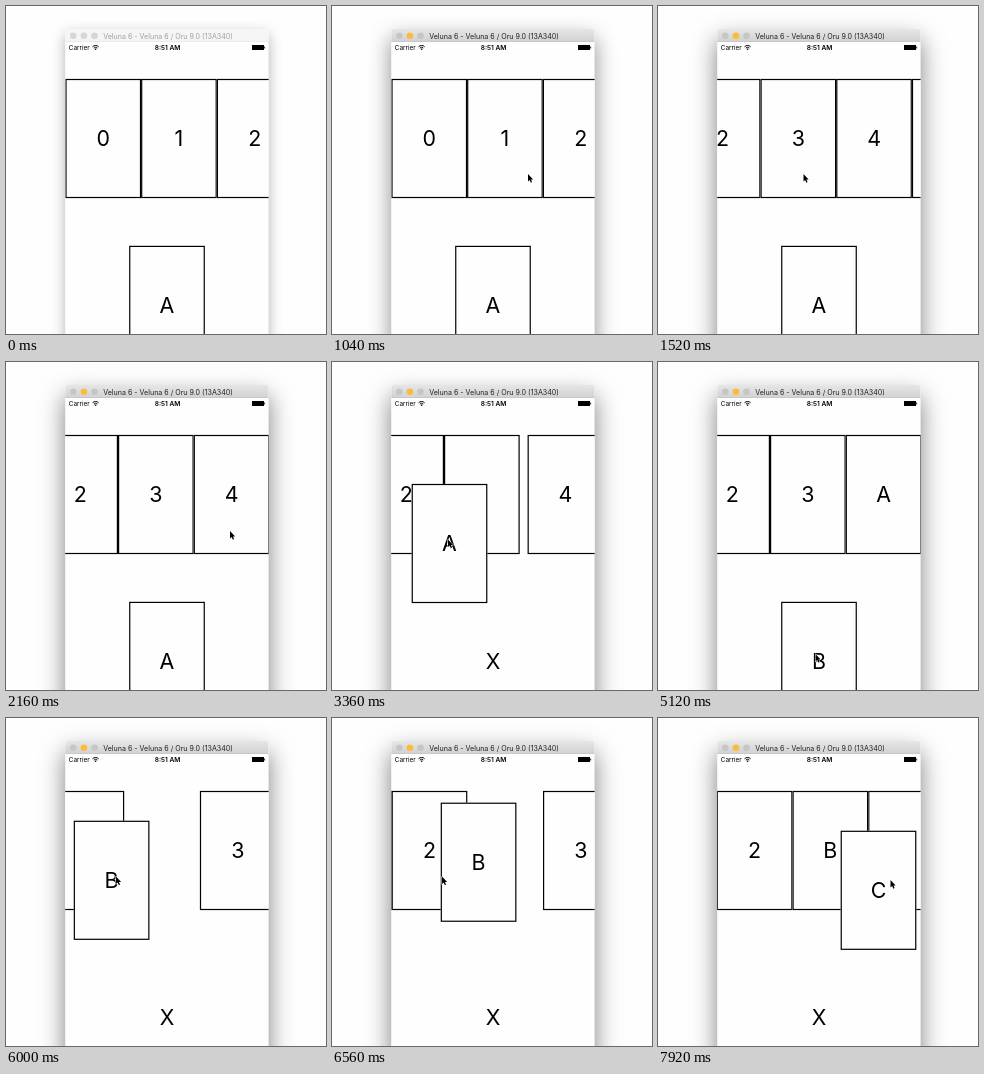
An HTML page with a canvas for the animation above (8 s loop, 320x328 px).

```html
<!DOCTYPE html>
<html lang="en">
<head>
<meta charset="utf-8">
<title>Drag and drop cards</title>
<style>
  html, body { margin: 0; width: 100%; height: 100%; overflow: hidden; background: #fefefe; }
  canvas { display: block; width: 320px; height: 328px; }
</style>
</head>
<body>
<canvas id="stage"></canvas>
<script>
const canvas = document.getElementById('stage');
const ctx = canvas.getContext('2d');
const ratio = window.devicePixelRatio || 1;
canvas.width = Math.round(320 * ratio);
canvas.height = Math.round(328 * ratio);

const LOOP = 8000, STEP = 80;
const FONT = 'Inter, "Open Sans", sans-serif';
const PAPER = '#fefefe';
const WIN = { x: 59.2, y: 23, w: 203.4, h: 420 };
const W = 75.7, H = 119.2;
const ROW = { x: 59.4, y: 132.5 };
const DECK = { x: 161, y: 299.4 };

// Swipe the row left, then pull it back with the pointer.
const SWIPE = { start: 1240, ms: 586, by: 253 };
const PULL = { start: 1840, ms: 320, by: 78.5 };
const EDGE_SPEED = 0.043; // px per ms while a card is held at the edge

const HAND = { show: 560, x: 203, y: 168 };
const moves = [
  { from: 560, to: 640, x: 196, y: 168 },
  { from: 1200, to: 1440, x: 145.5, y: 168 },
  { from: PULL.start, to: PULL.start + PULL.ms, x: 145.5 + PULL.by, y: 169 },
  { from: 2400, to: 2800, x: 164, y: 307 },
  { from: 2960, to: 3360, x: 116, y: 177.5 },
  { from: 3440, to: 4000, x: 185.5, y: 149.6 },
  { from: 4400, to: 5120, x: 157.5, y: 292 },
  { from: 5280, to: 6000, x: 110, y: 158.5 },
  { from: 6640, to: 7040, x: 216, y: 164 },
  { from: 7120, to: 7520, x: 164, y: 269 },
  { from: 7680, to: 7920, x: 232.5, y: 162 }
];

// slot: first number pushed aside; dx, dy: card centre relative to the pointer.
const cards = [
  { label: 'A', show: 0, lift: 2960, open: 3280, drop: 4240, slot: 4, dx: 1.5, dy: 4 },
  { label: 'B', show: 4640, lift: 5280, open: 5600, drop: 6400, slot: 3, dx: -4.4, dy: 3.8 },
  { label: 'C', show: 6800, lift: 7680, open: Infinity, drop: Infinity, slot: 4, dx: -12, dy: 10.3 }
];

const clamp = u => Math.min(1, Math.max(0, u));
const ramp = (t, start, ms) => clamp((t - start) / ms);
const smooth = u => u * u * (3 - 2 * u);
const easeOut = u => 1 - (1 - u) ** 2;
const mix = (a, b, u) => a + (b - a) * u;
const blend = (p, q, u) => ({ x: mix(p.x, q.x, u), y: mix(p.y, q.y, u) });

function pointer(t) {
  return moves.reduce((p, m) => blend(p, m, smooth(ramp(t, m.from, m.to - m.from))), HAND);
}

function scrollAt(t) {
  const swipe = SWIPE.by * easeOut(ramp(t, SWIPE.start, SWIPE.ms));
  const pull = PULL.by * smooth(ramp(t, PULL.start, PULL.ms));
  const edge = 542 * ramp(t, 5856, 542) - Math.max(0, t - 7901);
  return swipe - pull - EDGE_SPEED * edge;
}

// How many slots the inserted cards push a position to the right.
function pushed(t, slot, self) {
  return cards
    .filter(c => c !== self && c.slot <= slot)
    .reduce((sum, c) => sum + smooth(ramp(t, c.open, 400)), 0);
}

function rowPlace(t, slot, self) {
  const place = slot + pushed(t, slot, self);
  return { x: ROW.x + (place + .5) * W - scrollAt(t), y: ROW.y };
}

function cardPlace(t, card) {
  const hand = pointer(Math.min(t, card.drop));
  const held = { x: hand.x + card.dx, y: hand.y + card.dy };
  const dragged = blend(DECK, held, smooth(ramp(t, card.lift, 160)));
  return blend(dragged, rowPlace(t, card.slot, card), smooth(ramp(t, card.drop, 280)));
}

function text(str, x, y, size, color = '#000', weight = 400, align = 'center') {
  ctx.font = `${weight} ${size}px ${FONT}`;
  ctx.textAlign = align;
  ctx.fillStyle = color;
  ctx.fillText(str, x, y);
}

function disc(x, y, r, color) {
  ctx.fillStyle = color;
  ctx.beginPath();
  ctx.arc(x, y, r, 0, Math.PI * 2);
  ctx.fill();
}

function bigLabel(str, p) {
  text(str, p.x, p.y + 7.7, 21.4);
}

function drawCard(label, p) {
  const x = p.x - W / 2, y = p.y - H / 2;
  ctx.fillStyle = PAPER;
  ctx.fillRect(x, y, W, H);
  ctx.strokeStyle = '#000';
  ctx.lineWidth = 1.2;
  ctx.strokeRect(x + .6, y + .6, W - 1.2, H - 1.2);
  bigLabel(label, p);
}

function windowPath() {
  ctx.beginPath();
  ctx.roundRect(WIN.x, WIN.y, WIN.w, WIN.h, 3);
}

function drawShadow(focus) {
  ctx.save();
  ctx.shadowColor = `rgba(0,0,0,${mix(.3, .5, focus)})`;
  ctx.shadowBlur = mix(14, 25, focus) * ratio;
  ctx.shadowOffsetY = mix(5, 11, focus) * ratio;
  ctx.fillStyle = PAPER;
  windowPath();
  ctx.fill();
  ctx.restore();
}

function drawTitleBar(active) {
  const bar = ctx.createLinearGradient(0, 23, 0, 36);
  bar.addColorStop(0, active ? '#e6e6e6' : '#f6f6f6');
  bar.addColorStop(1, active ? '#d1d1d1' : '#f4f4f4');
  ctx.fillStyle = bar;
  ctx.fillRect(WIN.x, 23, WIN.w, 12.8);
  ctx.fillStyle = active ? '#b4b4b4' : '#dcdcdc';
  ctx.fillRect(WIN.x, 35.4, WIN.w, .5);
  const idle = active ? '#c6c6c6' : '#d6d6d6';
  for (let i = 0; i < 3; i++) {
    disc(67.3 + i * 10.6, 29.8, 3.3, active && i === 1 ? '#fdbb3c' : idle);
  }
  text('Veluna 6 - Veluna 6 / Oru 9.0 (13A340)', 162, 32.5, 7.1, active ? '#222' : '#a0a0a0');
}

function drawStatusBar() {
  text('Carrier', 62.8, 43.8, 6.4, '#000', 400, 'left');
  text('8:51 AM', 161.6, 43.8, 6.6, '#000', 600);
  ctx.strokeStyle = '#000';
  ctx.lineWidth = 1;
  for (const r of [2.4, 4.3]) {
    ctx.beginPath();
    ctx.arc(89.6, 43.8, r, -Math.PI * .75, -Math.PI * .25);
    ctx.stroke();
  }
  disc(89.6, 43.2, .8, '#000');
  ctx.fillStyle = '#000';
  ctx.fillRect(246, 39, 12, 5);
  ctx.fillRect(258.3, 40.5, .8, 2);
}

function drawCards(t) {
  for (let n = 0; n < 10; n++) drawCard(String(n), rowPlace(t, n));
  bigLabel('X', DECK);
  for (const card of cards) {
    if (t >= card.show) drawCard(card.label, cardPlace(t, card));
  }
}

function drawPointer(t) {
  if (t < HAND.show) return;
  const { x, y } = pointer(t);
  const arrow = new Path2D('M0 0V8.2L1.8 6.5L3.1 9.4L4.4 8.8L3.2 6H5.6Z');
  ctx.save();
  ctx.translate(x, y);
  ctx.lineJoin = 'round';
  ctx.lineWidth = 1.1;
  ctx.strokeStyle = '#fff';
  ctx.scale(.92, .92);
  ctx.stroke(arrow);
  ctx.fillStyle = '#000';
  ctx.fill(arrow);
  ctx.restore();
}

function draw(t) {
  ctx.setTransform(ratio, 0, 0, ratio, 0, 0);
  ctx.fillStyle = PAPER;
  ctx.fillRect(0, 0, 320, 328);
  drawShadow(ramp(t, 800, 320));
  ctx.save();
  windowPath();
  ctx.clip();
  drawCards(t);
  drawTitleBar(t >= 880);
  drawStatusBar();
  ctx.restore();
  drawPointer(t);
}

const start = performance.now();
function tick() {
  const t = (performance.now() - start) % LOOP;
  draw(Math.floor(t / STEP) * STEP);
  requestAnimationFrame(tick);
}
tick();
</script>
</body>
</html>
```
